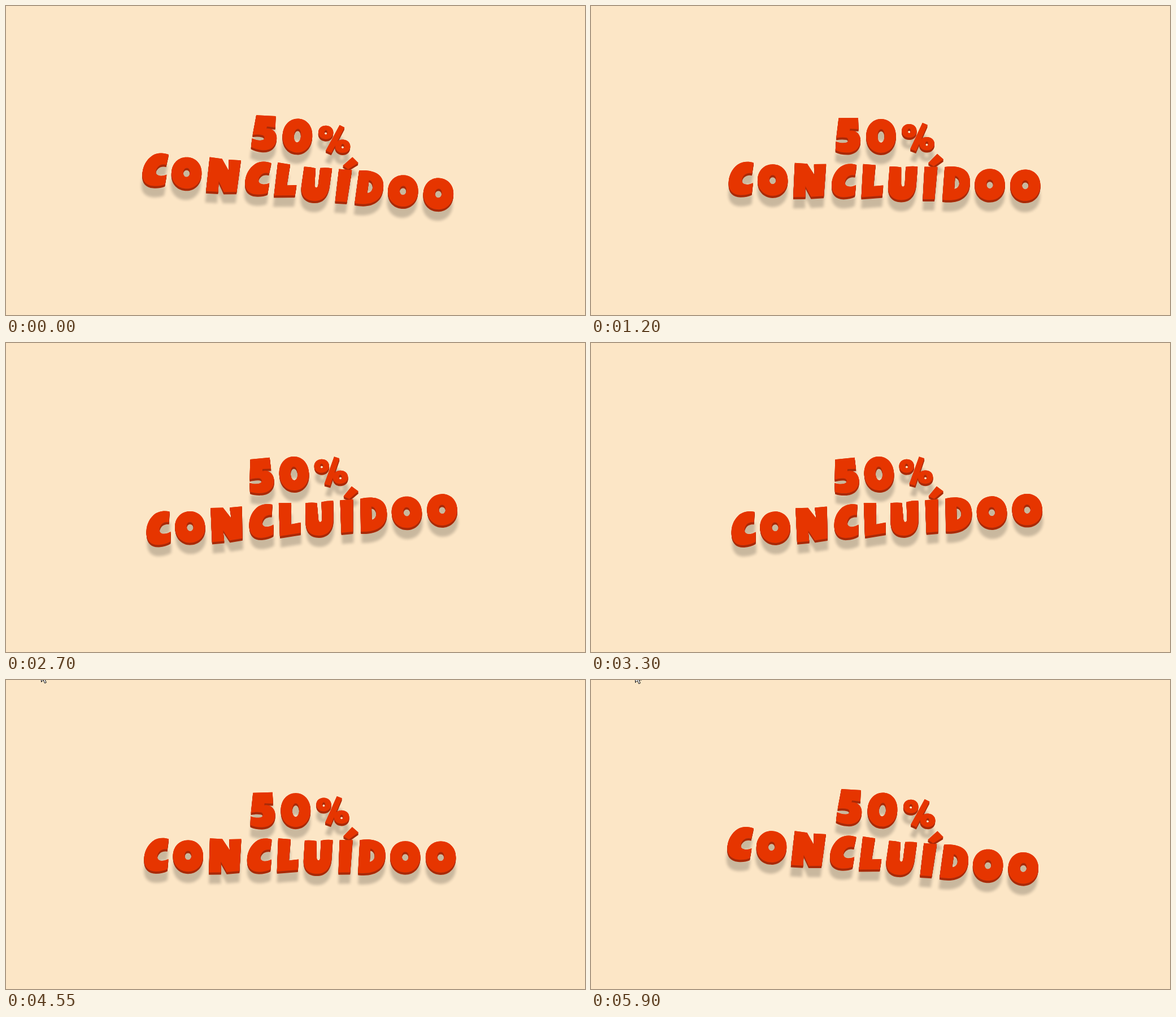
Write an HTML page with a canvas that moves like this. It is 1025 px wide and 547 px high and loops after 5950 ms.

```html
<!DOCTYPE html>
<html lang="pt">
<head>
<meta charset="utf-8">
<title>50% concluídoo</title>
<style>
  html, body { margin: 0; width: 100%; height: 100%; overflow: hidden; background: #fce6c6; }
  canvas { display: block; width: 100vw; height: 100vh; }
</style>
</head>
<body>
<canvas id="stage" width="1025" height="547" role="img" aria-label="50% CONCLUÍDOO"></canvas>
<script>
const ctx = document.getElementById('stage').getContext('2d');
const W = 1025, H = 547, LOOP = 5950;
const PIVOT = { x: 523, y: 270 };
const BG = '#fce6c6', FACE = '#e63500', SIDE = '#a92a08', SHADE = 'rgba(0,0,0,0.2)';
const DEPTH = 4, DROP = 20, BLUR = 5;

// Lettering, laid out upright in stage coordinates
const words = new Path2D();

function add(d, x = 0, y = 0) {
  words.addPath(new Path2D(d), new DOMMatrix([1, 0, 0, 1, x, y]));
}

// Rounded oval, a little fuller than an ellipse; hole = counter-clockwise
function oval(x, y, rx, ry, hole = false) {
  const k = 0.58, sx = hole ? -rx : rx, a = sx * k, b = ry * k;
  add(`M0 ${-ry} C${a} ${-ry} ${sx} ${-b} ${sx} 0 C${sx} ${b} ${a} ${ry} 0 ${ry}
       C${-a} ${ry} ${-sx} ${b} ${-sx} 0 C${-sx} ${-b} ${-a} ${-ry} 0 ${-ry}Z`, x, y);
}

function ring(x, y, rx, ry, hx, hy, dy = 0) {
  oval(x, y, rx, ry);
  oval(x, y + dy, hx, hy, true);
}

function letterC(x) {
  add(`M21.5 -28 C12 -31 1 -30 -7 -24 C-17 -16 -22 -4 -22 8 C-22 22 -14 29.5 -1 29.5
       C7 29.5 14 28 19.5 25 L21 7.5 C14 11 8 11.5 4 9 C0 6 1 -1 5 -5.5 C9 -10 15 -10.5 19 -9.5Z`, x, 310.5);
}

function letterO(x) {
  ring(x, 312.2, 26.7, 27.8, 6, 8, -0.8);
}

// 50%
add(`M437 200 L471.5 199 L472.5 219 L457.5 218.5 L457 222 C468 220 476.5 228 476.5 239
     C476.5 253 466 261 453 261 C445 261 438 259.5 432.5 257 L433 241.5
     C440 244.5 449 245 453 242.5 C456 240 455 235.5 451 234.5 C445 233.5 439 234 433.5 235.5Z`);
ring(512.7, 230.2, 26.3, 30, 6.2, 12);
ring(562.3, 220.3, 13.2, 12, 2.6, 4);
ring(594, 242.3, 13.4, 11.8, 2.6, 4);
add('M585.5 205.5 L594.5 209 L575 256 L564.8 252.5Z');

// CONCLUÍDOO
letterC(266.6);
letterO(322.5);
add('M361 281 L383 282 L396.5 302 L395 282.5 L416.5 282 L413.5 338.5 L391 340.5 L380.5 322 L381 341 L359.5 341.5Z');
letterC(449);
add('M482 280.5 L504 282 L501 319.5 L518.3 317.5 L517 336 L480 339.3Z');
add(`M529 284 Q539 283 549.5 285 L550 314 C550.5 321 556 321 556.5 314 L557.5 284 Q568 282 578.5 283
     L576.5 316 C574.5 334 565 343 550.5 343 C536 343 527 335 527 319Z`);
add('M590.7 283 L613.7 283 L609.5 340.2 L588.8 340.6Z');
add('M612.8 260 L624 269.5 L607 282 L597.2 276.5Z');
add(`M626.5 282.8 C654 278.5 672 287 671.8 309 C671.5 333 653 344.5 623.5 341Z
     M645.3 298 L644 321.5 C650 320.5 653 316 653 310 C653 303 650 299 645.3 298Z`);
letterO(707);
letterO(769.8);

// Linear interpolation through [time, ...values] keys
function track(keys, t) {
  let i = 1;
  while (i < keys.length - 1 && t > keys[i][0]) i++;
  const [a, b] = [keys[i - 1], keys[i]];
  const p = Math.min(1, Math.max(0, (t - a[0]) / (b[0] - a[0])));
  return a.slice(1).map((v, n) => v + (b[n + 1] - v) * p);
}

const SWING = [[0, 4.72], [75, 5], [3015, -5], [LOOP, 5]];
const POINTER = [[4150, 55, -15], [4300, 56, -13], [4850, 70, -12], [5050, 77, -12], [5400, 78, -12]];
const arrow = new Path2D('M0.5 0.5 V16.5 L4.2 13 L6.6 18.6 L9.2 17.5 L6.9 12 H11.8Z');

function drawWords(angle) {
  ctx.save();
  ctx.translate(PIVOT.x, PIVOT.y);
  ctx.rotate(angle);
  ctx.translate(-PIVOT.x, -PIVOT.y);

  // Canvas shadows ignore the transform, so the offset is turned by hand
  ctx.shadowColor = SHADE;
  ctx.shadowBlur = BLUR;
  ctx.shadowOffsetX = -DROP * Math.sin(angle);
  ctx.shadowOffsetY = DROP * Math.cos(angle);
  ctx.fillStyle = FACE;
  ctx.fill(words);
  ctx.shadowColor = 'transparent';

  ctx.fillStyle = SIDE;
  for (let y = DEPTH; y > 0; y--) {
    ctx.save();
    ctx.translate(0, y);
    ctx.fill(words);
    ctx.restore();
  }
  ctx.fillStyle = FACE;
  ctx.fill(words);
  ctx.restore();
}

function drawPointer(t) {
  if (t < POINTER[0][0]) return;
  const [x, y] = track(POINTER, t);
  ctx.save();
  ctx.translate(Math.round(x), Math.round(y));
  ctx.fillStyle = '#fff';
  ctx.strokeStyle = '#000';
  ctx.lineWidth = 1;
  ctx.fill(arrow);
  ctx.stroke(arrow);
  ctx.restore();
}

const start = performance.now();

function frame() {
  const t = (performance.now() - start) % LOOP;
  ctx.fillStyle = BG;
  ctx.fillRect(0, 0, W, H);
  drawWords(track(SWING, t)[0] * Math.PI / 180);
  drawPointer(t);
  requestAnimationFrame(frame);
}
frame();
</script>
</body>
</html>
```
